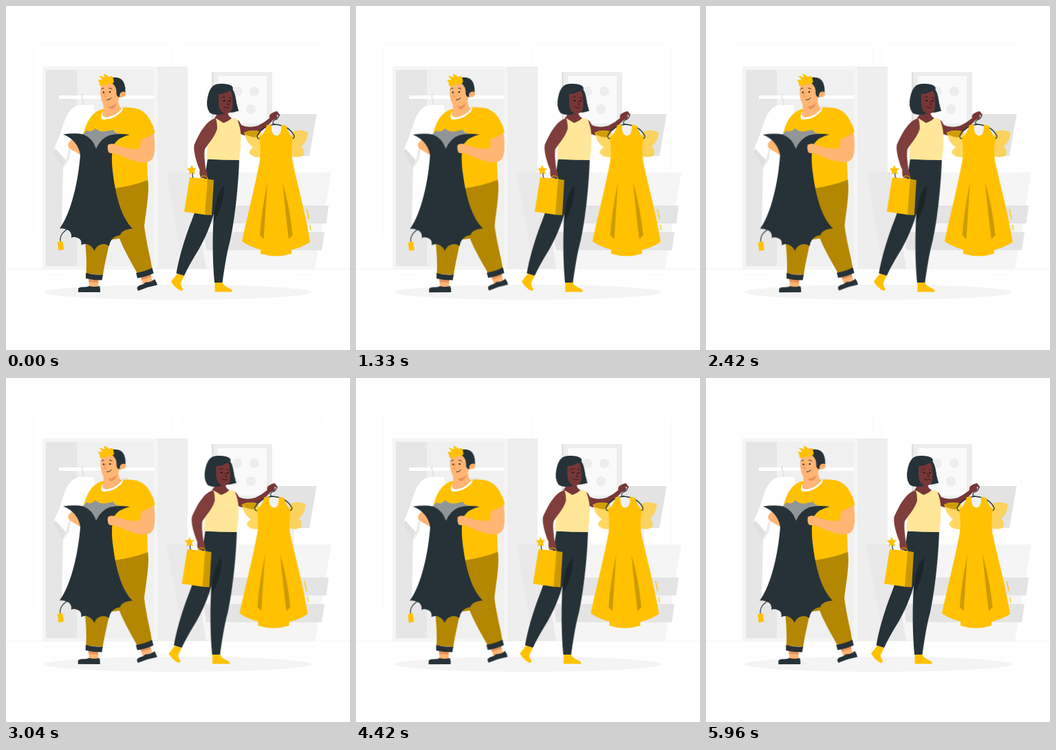
An HTML page that plays this animation: 500 by 500 pixels, repeating every 6 s.

```html
<!DOCTYPE html>
<html lang="en">
<head>
<meta charset="utf-8">
<title>Trying on costumes</title>
<style>
  html, body { margin: 0; width: 100%; height: 100%; overflow: hidden; background: #fff; }
  svg { display: block; width: 100%; height: 100%; }

  .gold { fill: #ffc100; }
  .ochre { fill: #b38700; }
  .fold { fill: #cc9a00; }
  .dark { fill: #263238; }
  .skin { fill: #ffb573; }
  .tan { fill: #e8925c; }
  .brown { fill: #7f3e3b; }
  .umber { fill: #773738; }
  .line { fill: none; stroke: #263238; stroke-linecap: round; stroke-linejoin: round; }

  #man { transform-origin: 146px 258px; animation: sway 1.5s linear infinite; }
  #woman { animation: shake 6s linear infinite; }

  @keyframes sway {
    0%, 100% { transform: rotate(0deg); }
    25% { transform: rotate(1deg); }
    75% { transform: rotate(-1deg); }
  }
  @keyframes shake {
    0%, 100% { transform: translateX(0); }
    10%, 90% { transform: translateX(-1px); }
    20%, 80% { transform: translateX(2px); }
    30%, 50%, 70% { transform: translateX(-4px); }
    40%, 60% { transform: translateX(4px); }
  }
</style>
</head>
<body>
<svg viewBox="0 0 500 500">
  <g id="room">
    <path d="M39.500 337V55.500H242.500V337M255.500 337V55.500H458.500V337" fill="none" stroke="#fafafa"/>
    <path d="M0 382.500H500" stroke="#f5f5f5"/>
    <path d="M415 390.500H448M362 397.500H377M53 390.500H95" stroke="#fafafa"/>

    <!-- wardrobe -->
    <path d="M53 88H220V382H53z" fill="#f5f5f5"/>
    <path d="M220 88H264V382H220z" fill="#eee"/>
    <path d="M58 93H215V378H58z" fill="#f0f0f0"/>
    <path d="M58 93H103V378H58z" fill="#e6e6e6"/>
    <path d="M165 147Q176 142 180 150L186 170H160z" fill="#e6e6e6"/>
    <path d="M77 130H215V135H77z" fill="#fff"/>
    <path d="M112 146V136Q108 130 112 128" fill="none" stroke="#e0e0e0" stroke-width="1.500"/>
    <path d="M106 144H128L140 320H81L83 234L68 212Q78 190 85 167Q92 147 106 144z" fill="#fff"/>
    <path d="M68 212L71.500 207L87 224L83 235z" fill="#e0e0e0"/>
    <path d="M87 224L98 180L92 222L84 236z" fill="#ebebeb"/>

    <!-- poster -->
    <path d="M299 96H387V188H299z" fill="#ededed"/>
    <path d="M299 96H301.500V188H299z" fill="#e0e0e0"/>
    <path d="M308 102H379V171H308z" fill="#fafafa"/>
    <g fill="#ededed">
      <circle cx="361" cy="124" r="7"/>
      <circle cx="336" cy="124" r="7"/>
      <circle cx="356" cy="150" r="7"/>
      <circle cx="331" cy="150" r="7"/>
    </g>

    <!-- counter -->
    <path d="M390 157H451.500L441 218H380z" fill="#e3e3e3"/>
    <path d="M412 218H419V242H412z" fill="#f0f0f0"/>
    <path d="M233 242H473L449 382H258z" fill="#f5f5f5"/>
    <path d="M233 242H268L291 382H258z" fill="#e9e9e9"/>
    <path d="M281 290H469L465.500 316H285zM287 328.500H463L459 355H291z" fill="#e4e4e4"/>
  </g>

  <ellipse cx="250" cy="416" rx="194" ry="11" fill="#f4f4f4"/>

  <g id="man">
    <!-- legs and shoes -->
    <path class="skin" d="M120 396H134.500L134 409H121zM196 394L210 389L213 400L199 404z"/>
    <path class="tan" d="M120 396H134.500L134 402L120.500 401zM196 394L210 389L211.500 393.500L197 398z"/>
    <path class="dark" d="M105 416V411Q106 408.500 111 408.500Q117 409 121 407Q128 409 136 407Q137.500 411 137 416z"/>
    <path class="dark" d="M192 414L190.500 410Q191 407 196 405.500Q201 404 203 401.500Q210 402 216 397Q219 401 220 405.500Q206 408 192 414z"/>
    <path class="ochre" d="M112 300L158 258L206 252C209 268 204 296 201 320C204 345 210 365 212.500 383L191 389C182 372 172 356 165 338L151 340C148 358 143 375 141 391L116.500 389Q118 365 114 335z"/>
    <path class="dark" d="M116 388Q128 391.500 141 390.500L139.500 398.500Q127 398.500 116 396zM189 388Q202 386 212.500 380.500L214.500 388.500Q203 394 191 395.500z"/>

    <!-- left forearm, shirt -->
    <path class="skin" d="M104 192C94 193 88 200 91 205C95 210 103 212 108 217L116 200z"/>
    <path class="gold" d="M139 150C124 155 117 168 112 188L140 262L158 265Q186 261 206 253Q204.500 222 205 192L216 184C212 166 204 153 190 149Q180 146.500 168 148z"/>

    <!-- neck and collar -->
    <path d="M139.500 155Q137.500 160 139 164.500Q155 167 168.500 153L170 148L163 149z" fill="#fff"/>
    <path class="skin" d="M141 142Q143 150 140 157Q140 161.500 146 162Q160 160 168 149.500Q163 146 163 134z"/>
    <path class="tan" d="M148 146Q155 146 161 141Q158 150 152 150z"/>

    <!-- head -->
    <path class="skin" d="M139 112C136 124 137 135 141 142Q145 147 151 146Q160 144 164 135L166 112Q152 102 139 112z"/>
    <path class="dark" d="M150 105Q160 102 167 106Q174 111 173.500 125Q171 129 168 132Q162 134 160.500 128Q161 117 155 113z"/>
    <path class="skin" d="M165.500 128Q167 124.500 171 124.500Q175.500 125.500 174 129.500Q171 134 165 132z"/>
    <path d="M168 130Q169 126.500 172 127" fill="none" stroke="#e8925c" stroke-width=".8"/>
    <path class="gold" d="M136 116Q137 112 133.500 107.500Q138 107 140 107.500Q137 103 135 101.500Q140 102 143 104Q143 101 142 98.500Q147 100 149 103Q152 101.500 154 102Q157 106 156.500 111Q154 115 149 113Q144 116 136 116z"/>
    <circle class="dark" cx="141.800" cy="125.500" r="1.200"/>
    <circle class="dark" cx="151" cy="125" r="1.300"/>
    <path class="line" d="M138.500 121Q140 118.500 142 119.500M150 119.500Q152.500 118.500 154 121" stroke-width="1"/>
    <path d="M145 125Q143 129 142.500 131.500L146 132" fill="none" stroke="#e8925c" stroke-width="1"/>
    <path class="line" d="M146.500 136.500Q150.500 137 153 133.500" stroke-width="1"/>

    <!-- cape -->
    <path d="M110 188L117 181Q122 182.500 125 181.500Q128 180 130 177.500Q133 181 137 182Q143 183 148 181.500L156 180Q157 184 162 185L172 187L150 196L131 209z" fill="#909698"/>
    <path class="dark" d="M83 186.500Q101 184 112 186.500Q126 192 131 207.500Q137 193 150 188Q163 184.500 180 187Q163 191 157 201Q152 214 155 240C159 274 167 307 184 323.500Q168 325 166 333Q152 335 150 349Q144 344 137 347Q131 349 128.500 356Q126 350 121 347.500Q115 344 109.500 347.500Q110 339 105 337.500Q99 334.500 95 337Q96 327 88 325Q83 322.500 78 323.500C95 300 105 255 108 216Q104 195 83 186.500z"/>
    <path class="line" d="M88 325Q77 333 79 343" stroke-width="1.200"/>
    <path class="gold" d="M75 344L78.500 341.500L82.500 342.500L84 354L76.500 355.500z"/>

    <!-- right arm -->
    <path class="skin" d="M196 194L215 184C216 194 217 204 215.500 214C214 225 207 229 194 227C178 224 167 217 157 213.500Q149 215 148.500 211Q147 207 148 202Q153 199 159 201.500C172 206 184 209 195 207z"/>
    <path class="gold" d="M196 170L213 172L216.500 183.500Q207 191 196 193.500z"/>
  </g>

  <g id="woman">
    <!-- raised arm -->
    <path class="umber" d="M330 163Q339 165 342 173Q352 178 366 174Q376 169 383 163Q382 158 386 156Q391 153 394 153Q398 157 398 160Q395 158 393 158Q396 161 393 164Q388 165 386 168Q374 181 362 188Q348 191 338 184z"/>

    <!-- wings -->
    <g fill="#ffcf40" opacity=".82">
      <path d="M346 184Q357 178 371 183V219Q360 222 353 213Q355 208 359 205Q350 199 348 190z"/>
      <path d="M416 183Q426 178 439 183.500Q438 198 429 204Q434 208 432.500 217Q425 222 414 218z"/>
    </g>
    <path class="fold" d="M346 184Q356 178.500 370 183Q368 189 362 191Q352 190 346 184z" opacity=".9"/>

    <!-- gown on its hanger -->
    <path d="M386 172H400.500V188H386z" fill="#f1f1f1"/>
    <path class="line" d="M397 158Q396 164 392 165Q387 167 388 171L391 172M391 172Q372 174 365 189Q365 193 369 193M391 172Q412 174 419 189Q419 193 415 193" stroke-width="1.300"/>
    <path class="gold" d="M379 173L386 172.500Q385 188 393 188.500Q401 188 400 172.500L407.500 174Q411 187 417 191Q414 206 416 224C423 257 436 304 442 343Q430 351 415 354.500V360Q393 367 370 360V354Q354 350 343 342C351 304 362 262 369 224Q371 206 368 191Q376 186 379 173z"/>
    <path class="fold" d="M380 256Q371 300 369 333L374.500 339Q377 298 380 256zM402 256Q406 300 411 339L416.500 333Q413 295 402 256z"/>
    <path d="M437 295L440.500 310M441.500 318L443 326" fill="none" stroke="#ffc100" stroke-width="1.200"/>

    <!-- legs and shoes -->
    <path class="gold" d="M249 389L240 400.500Q244 408 253 413.500Q257 414.500 257 411Q252 405 255 400L259 392zM303.500 401H314Q316 407 325 410.500Q329 412 329 415.500H303.500z"/>
    <path class="dark" d="M293 222.500H339C338 258 333 308 326 340C320 362 317 385 314.500 402H303C300 368 300 332 302 302C295 327 283 350 274 364Q265 379 259 392L247.500 388.500C251 368 258 344 266 322C278 292 288 260 293 222.500z"/>
    <path d="M317 261Q306 272 303 300L302 314Q317 290 317 261z" fill="#1b2429"/>

    <!-- neck and top -->
    <path class="umber" d="M307 148Q308 158 303 163Q310 174 319 171L328 163Q322 160 322 152z"/>
    <path d="M304.500 163Q310 166 316 170Q322 168 330 162.500L336 164.500Q341 176 341.500 190Q341.500 208 339 224Q315 224 291.500 222.500Q292 204 295 194Q303 184 305 176z" fill="#ffe699"/>

    <!-- lowered arm -->
    <path class="brown" d="M304.500 163C291 167 282 183 273.500 202C272 211 277 228 281.500 238Q281 246 283 249Q288 252 292 249Q294 244 290.500 238C289 226 287.500 215 289 208C297 196 304 189 307 178Q307 168 304.500 163z"/>

    <!-- head -->
    <path class="dark" d="M300 117Q304 113 312 113Q322 112.500 327 115.500Q331 118 329.500 121.500Q333 126 334 136Q336 147 338 152.500Q329 155 324 155L313 157.500Q301 159 296 155Q290 146 293 133Q295 122 300 117z"/>
    <path class="umber" d="M309 128Q318 128 325 123Q329.500 126 330.500 133Q331.500 145 328 152Q323 158 317 156Q310 153 309 143z"/>
    <path class="dark" d="M329 121.500Q334 130 335 141Q337 149 338 152.500L328 154.500Q331 140 328 126z"/>
    <circle cx="317" cy="137.500" r="1.200" fill="#1b1516"/>
    <circle cx="325.500" cy="138" r="1.200" fill="#1b1516"/>
    <path d="M313.500 133.500Q316 131 318.500 132M324.500 133Q327 132.500 328.500 134.500M317 146.500Q321 149.500 325 147.500M322 138L324 143.500L321.500 144" fill="none" stroke="#3a181a" stroke-width=".9" stroke-linecap="round"/>

    <!-- bag and wand -->
    <path class="line" d="M271.500 242Q270 246 272.500 251" stroke-width="1.200"/>
    <path class="gold" d="M270 231L272 235.500L277 236L273.500 239.500L275 244.500L270.500 242.500L266 245L266.500 240L263 236.500L268 235.500z"/>
    <path d="M283 251Q284 246 288 247Q293 247 293 253" fill="none" stroke="#cc9a00" stroke-width="1.400"/>
    <path class="gold" d="M267 249L294 251.500L290 303.500L259 299z"/>
    <path class="fold" d="M293 251.500L302 253L299 304L289 303.500z"/>
  </g>
</svg>
</body>
</html>
```
